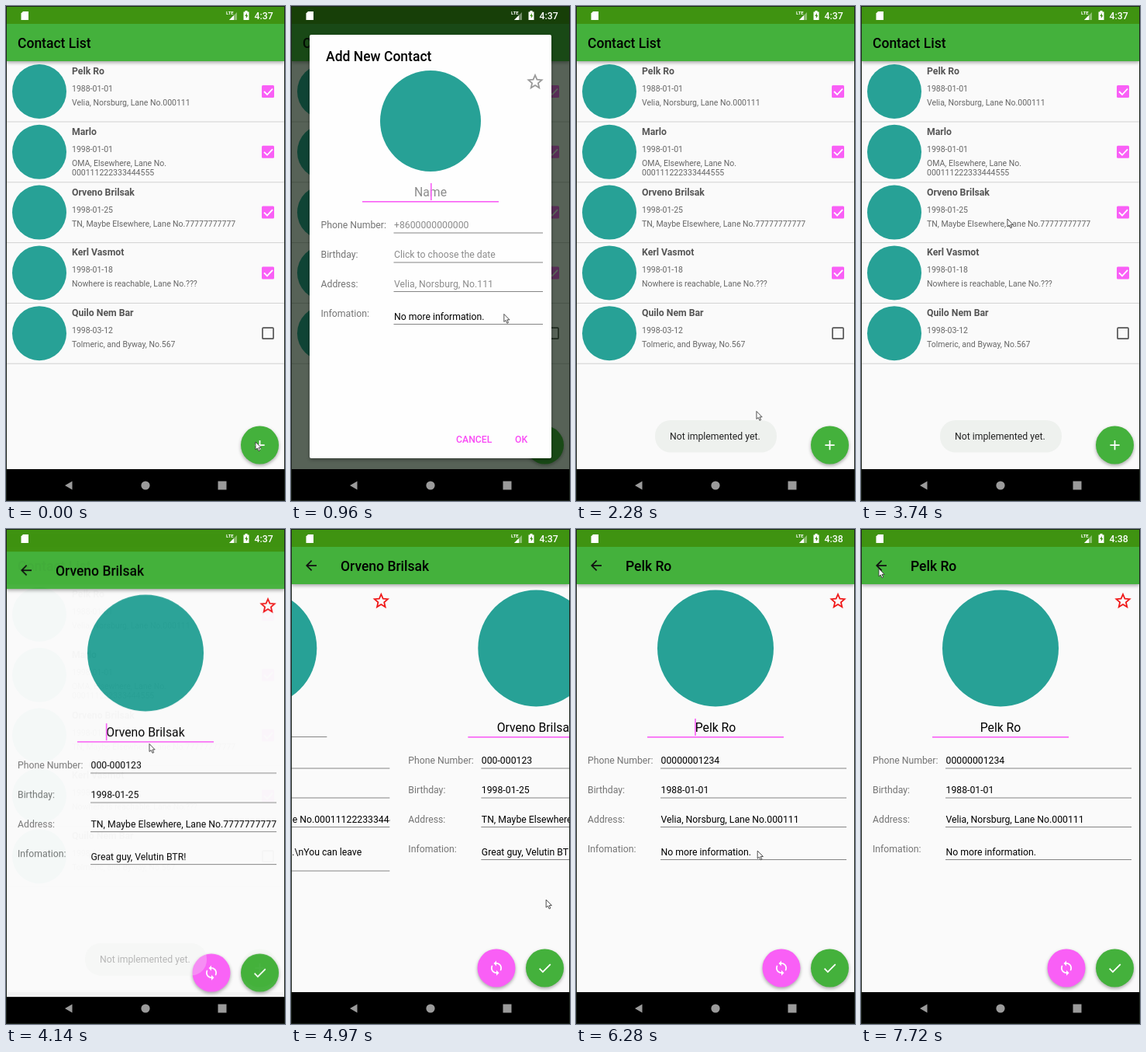
Animation of 360x637 px, one loop 8 s. Source, as an HTML page:

```html
<!DOCTYPE html>
<html lang="en">
<head>
<meta charset="utf-8">
<title>Contact List</title>
<style>
  html, body { margin: 0; width: 100%; height: 100%; overflow: hidden; background: #000; }
  svg { display: block; width: 360px; height: 637px; }
  text { font: 12.25px Roboto, sans-serif; white-space: pre; }
  .title { font-size: 17.5px; font-weight: 500; }
  .name { font-size: 15.75px; text-anchor: middle; }
  .bold { font-weight: 700; fill: #555; }
  .small { font-size: 10.5px; fill: #666; }
  .label { fill: #757575; }
  .hint { fill: #8c8c8c; }
  .button { font-weight: 500; fill: #f94cf5; }
  .clock { font-weight: 500; fill: #fff; }
  .lte { font-size: 6px; font-weight: 700; fill: #fff; }
  .clip { clip-path: url(#field); }
  .raised { filter: drop-shadow(0 2px 2px #0005); }
</style>
</head>
<body>
<svg id="stage" viewBox="0 0 360 637" xmlns="http://www.w3.org/2000/svg"></svg>
<script>
const GREEN = '#44b13c', DARK = '#3f9311', PINK = '#f95ff6', TEAL = '#27a196', PAPER = '#fafafa';

const contacts = [
  { name: 'Pelk Ro', date: '1988-01-01', phone: '00000001234',
    address: ['Velia, Norsburg, Lane No.000111'], info: ['No more information.'] },
  { name: 'Marlo', date: '1998-01-01', phone: '000-000123',
    address: ['OMA, Elsewhere, Lane No.', '000111222333444555'],
    info: ['No more information.\\nYou can leave', 'something here.'] },
  { name: 'Orveno Brilsak', date: '1998-01-25', phone: '000-000123',
    address: ['TN, Maybe Elsewhere, Lane No.77777777777'], info: ['Great guy, Velutin BTR!'] },
  { name: 'Kerl Vasmot', date: '1998-01-18', address: ['Nowhere is reachable, Lane No.???'] },
  { name: 'Quilo Nem Bar', date: '1998-03-12', address: ['Tolmeric, and Byway, No.567'] }
];

const ICONS = {
  plus: 'M19 13h-6v6h-2v-6H5v-2h6V5h2v6h6z',
  check: 'M9 16.17 4.83 12l-1.42 1.41L9 19 21 7l-1.41-1.41z',
  back: 'M20 11H7.83l5.59-5.59L12 4l-8 8 8 8 1.41-1.41L7.83 13H20z',
  sync: 'M12 4V1L8 5l4 4V6c3.31 0 6 2.69 6 6 0 1.01-.25 1.97-.7 2.8l1.46 1.46C19.54 15.03 20 13.57 20 12c0-4.42-3.58-8-8-8z' +
        'm0 14c-3.31 0-6-2.69-6-6 0-1.01.25-1.97.7-2.8L5.24 7.74C4.46 8.97 4 10.43 4 12c0 4.42 3.58 8 8 8v3l4-4-4-4z'
};

// Drawing helpers
const rect = (x, y, w, h, fill, more = '') =>
  `<rect x="${x}" y="${y}" width="${w}" height="${h}" fill="${fill}" ${more}/>`;
const circle = (x, y, r, fill, more = '') => `<circle cx="${x}" cy="${y}" r="${r}" fill="${fill}" ${more}/>`;
const text = (x, y, value, cls = '', more = '') => `<text x="${x}" y="${y}" class="${cls}" ${more}>${value}</text>`;
const path = (d, fill, more = '') => `<path d="${d}" fill="${fill}" ${more}/>`;
const group = (id, body, more = '') => `<g id="${id}" ${more}>${body}</g>`;
const icon = (name, x, y, fill = '#fff', scale = .875) =>
  path(ICONS[name], fill, `transform="translate(${x} ${y}) scale(${scale}) translate(-12 -12)"`);
const fab = (x, fill, name) => circle(x, 565, 24.5, fill, 'class="raised"') + icon(name, x, 565);

function star(cx, cy, color) {
  const points = Array.from({ length: 10 }, (_, i) => {
    const r = i % 2 ? 4.1 : 9, a = (i / 5 - .5) * Math.PI;
    return `${(cx + r * Math.cos(a)).toFixed(2)},${(cy + r * Math.sin(a)).toFixed(2)}`;
  });
  return `<polygon points="${points.join(' ')}" fill="none" stroke="${color}" stroke-width="1.8"/>`;
}

// Window background with status bar, toolbar and navigation bar
const chrome = (title, body) =>
  rect(1, 1, 358, 636, PAPER) + body +
  rect(1, 23, 358, 48, GREEN, 'class="raised"') + rect(1, 1, 358, 22, DARK) + title +
  rect(0, 596, 360, 90, '#000');

function row(c, i) {
  const y = i * 77.8;
  const box = i < 4
    ? rect(330, 102, 16, 16, PINK, 'rx="1.5"') + path('M333 110l4 4 7-7.500', 'none', 'stroke="#fff" stroke-width="1.8"')
    : rect(331, 103, 14, 14, 'none', 'rx="1" stroke="#555" stroke-width="1.7"');
  return `<g transform="translate(0 ${y})">` +
    circle(43, 110, 35, TEAL) + text(85, 88, c.name, 'bold') + text(85, 110, c.date, 'small') +
    c.address.map((line, k) => text(85, 128 + k * 12.3, line, 'small')).join('') +
    box + rect(1, 148.500, 358, 1, '#d2d2d2') + '</g>';
}

function field(x, right, y, label, lines, cls, drop = 0) {
  const last = y + drop + (lines.length - 1) * 14.5;
  return text(x, y, label, 'label') +
    lines.map((line, k) => text(x + 94.5, y + drop + k * 14.5, line, cls)).join('') +
    rect(x + 94, last + 5.500, right - x - 94, 1, '#858585');
}

const page = (c, i) => `<g transform="translate(${i * 358} 0)">` +
  circle(180, 153.500, 75, TEAL) + star(338, 93, '#f01818') +
  text(180, 261, c.name, 'name') + rect(92, 267, 176, 1, '#858585', `id="line${i}"`) +
  rect(150, 244, 1.6, 22, PINK, `id="caret${i}"`) +
  field(15, 349, 302, 'Phone Number:', [c.phone], 'clip') +
  field(15, 349, 340, 'Birthday:', [c.date], 'clip') +
  field(15, 349, 377.500, 'Address:', [c.address.join('')], 'clip') +
  field(15, 349, 415.500, 'Infomation:', c.info, 'clip', 4) + '</g>';

const dialog =
  rect(24, 37, 312, 545, '#fefefe', 'rx="2" class="raised"') +
  text(45, 71, 'Add New Contact', 'title') + star(315, 98, '#999') + circle(180, 148, 65, TEAL) +
  text(180, 245, 'Name', 'name hint') + rect(92, 251, 176, 1.6, PINK) +
  rect(180, 228, 1.6, 22, PINK, 'id="dialogCaret"') +
  field(38.5, 325, 286, 'Phone Number:', ['+8600000000000'], 'hint') +
  field(38.5, 325, 324, 'Birthday:', ['Click to choose the date'], 'hint') +
  field(38.5, 325, 361.500, 'Address:', ['Velia, Norsburg, No.111'], 'hint') +
  field(38.5, 325, 399.500, 'Infomation:', ['No more information.'], '', 4) +
  text(213, 562, 'CANCEL', 'button') + text(289, 562, 'OK', 'button');

const system =
  path('M22 7h7v11h-9.500v-8.500z', '#fff') + text(284, 11, 'LTE', 'lte') +
  path('M298 8v10h-10z', '#fff', 'opacity=".4"') + path('M294 12v6h-6z', '#fff') +
  path('M308.500 6h3v1.500h2V18h-7V7.500h2z', '#fff') + path('M310.800 9l-2.500 4h1.500v3l2.500-4h-1.500z', DARK) +
  text(320.5, 17, '4:37', 'clock', 'id="clock"') +
  path('M76 617l9.500-5.500v11z', '#9b9b9b') + circle(180, 617, 5.6, '#9b9b9b') + rect(273.5, 611.5, 11, 11, '#9b9b9b');

const stage = document.getElementById('stage');
stage.innerHTML =
  '<clipPath id="field"><rect x="109" y="280" width="240" height="180"/></clipPath>' +
  group('list', chrome(text(15, 54, 'Contact List', 'title'), contacts.map(row).join('') + fab(327.5, GREEN, 'plus'))) +
  group('dim', rect(1, 1, 358, 595, '#041404', 'opacity=".66"')) +
  group('dialog', dialog) +
  group('detail', chrome(icon('back', 26, 47, '#111') + text(64, 54, '', 'title', 'id="title"'),
    group('pager', contacts.slice(0, 3).map(page).join('')) + fab(265, PINK, 'sync') + fab(327.5, GREEN, 'check'))) +
  system +
  group('toast', rect(102, 533, 157, 41.5, '#eef1ee', 'rx="20"') + text(121, 558, 'Not implemented yet.', '', 'fill="#222"')) +
  rect(.5, .5, 359, 636, 'none', 'stroke="#1c241c"') +
  group('pointer', path('M0 0v10l2.300-2 1.700 3.800 1.700-.8-1.700-3.600h3.200z', '#fff', 'stroke="#3a3a3a" stroke-width=".9"'));

const $ = id => document.getElementById(id);
const set = (id, attrs) => { for (const k in attrs) $(id).setAttribute(k, attrs[k]); };

// Carets stand at the start of each centred name
for (let i = 0; i < 3; i++) {
  const name = $('caret' + i).parentNode.querySelector('.name');
  set('caret' + i, { x: 179.5 - name.getComputedTextLength() / 2 });
}

// Timing
const LOOP = 8000;
const ramp = (t, from, to) => Math.min(1, Math.max(0, (t - from) / (to - from)));
const easeOut = (u, power = 2) => 1 - (1 - u) ** power;
const blink = (t, start) => t >= start && (t - start) % 1000 < 500 ? 1 : 0;

const mouse = [
  [0, 322, 561], [560, 322, 561], [960, 275, 396], [1320, 222, 548], [1560, 225, 556], [1900, 225, 556],
  [2280, 233, 522], [2660, 213, 345], [2720, 213, 336], [2860, 194, 283], [3070, 194, 283], [3180, 189, 274],
  [3740, 189, 274], [4140, 185, 276], [4520, 186, 470], [4580, 186, 470], [4970, 329, 477], [5040, 340, 477],
  [5360, 142, 468], [5410, 142, 468], [5760, 307, 471], [6170, 255, 465], [6220, 255, 465], [6710, 88, 56],
  [6870, 88, 56], [7450, 23, 51], [LOOP, 23, 51]
];
function pointerAt(t) {
  const i = mouse.findIndex(m => m[0] > t), [a, b] = [mouse[i - 1], mouse[i]];
  const u = ramp(t, a[0], b[0]);
  return [a[1] + (b[1] - a[1]) * u, a[2] + (b[2] - a[2]) * u];
}

// A swipe follows the finger, then settles on the next page
function swipe(t, start, release, end, dragged) {
  return dragged * ramp(t, start, release) + (358 - dragged) * easeOut(ramp(t, release, end));
}

function draw(t) {
  const shown = easeOut(ramp(t, 680, 840)), hidden = ramp(t, 1910, 2060);
  const scale = .92 + .08 * shown;
  set('dim', { opacity: shown * (1 - hidden) });
  set('dialog', {
    opacity: shown * (1 - hidden),
    transform: `translate(180 310) scale(${scale}) translate(-180 -310)`
  });
  set('dialogCaret', { opacity: blink(t, 900) });
  set('toast', { opacity: ramp(t, 1960, 2160) * (1 - ramp(t, 3850, 4270)) });

  set('detail', {
    opacity: easeOut(ramp(t, 4020, 4220), 4),
    transform: `translate(0 ${51 * (1 - easeOut(ramp(t, 4020, 4370), 5))})`
  });
  const offset = swipe(t, 4600, 5030, 5340, 158) + swipe(t, 5430, 5750, 6090, 144);
  set('pager', { transform: `translate(${offset - 716} 0)` });
  $('title').textContent = contacts[t < 5030 ? 2 : t < 5750 ? 1 : 0].name;

  const focus = t < 5300 ? 2 : t < 6220 ? 1 : 0, focusStart = [6220, 5300, 4020][focus];
  for (let i = 0; i < 3; i++) {
    const on = i === focus;
    set('line' + i, { fill: on ? PINK : '#858585', height: on ? 1.6 : 1 });
    set('caret' + i, { opacity: on ? blink(t, focusStart) : 0 });
  }
  $('clock').textContent = t < 6100 ? '4:37' : '4:38';
  set('pointer', { transform: `translate(${pointerAt(t)})` });
}

const began = performance.now();
function tick() {
  draw((performance.now() - began) % LOOP);
  requestAnimationFrame(tick);
}
tick();
</script>
</body>
</html>
```
